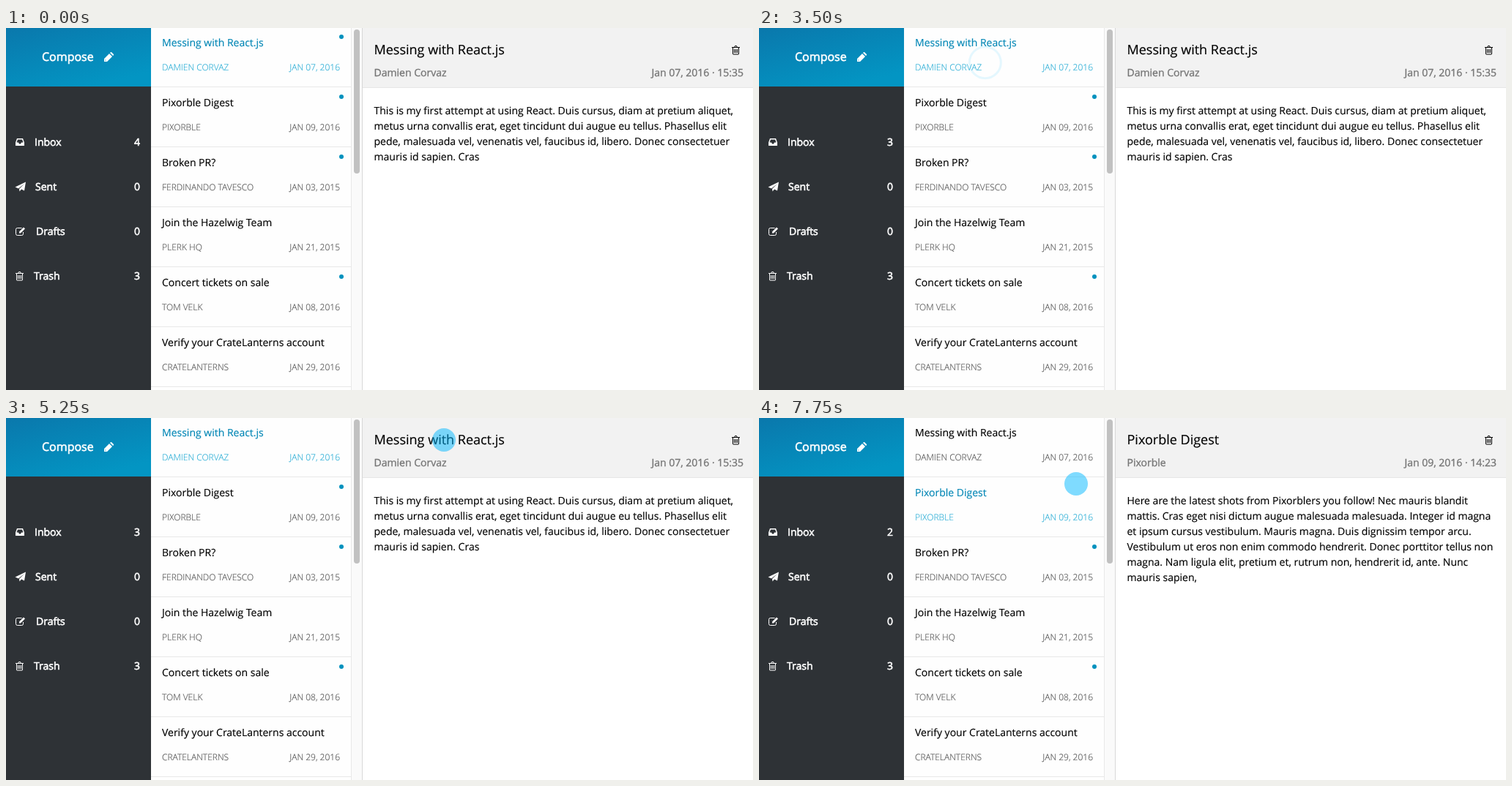
An HTML page for the animation above (8 s loop, 1020x495 px).

```html
<!DOCTYPE html>
<html lang="en">
<head>
<meta charset="utf-8">
<title>Mailbox</title>
<style>
  html, body { margin: 0; width: 100%; height: 100%; overflow: hidden; background: #fff; }
  svg { display: block; font: 14px "Open Sans", sans-serif; text-rendering: geometricPrecision; }
  text { white-space: pre; stroke: #000; stroke-width: .15px; }
  .end { text-anchor: end; }
  .side { fill: #fff; stroke: #fff; stroke-width: .6px; }
  .compose { font-size: 16px; }
  .head { font-size: 18px; }
  .meta { fill: #777; stroke: #777; stroke-width: .35px; }
  .small { font-size: 12px; font-weight: 300; fill: #555; stroke: #555; }
  .selected .title { fill: #0086b5; stroke: #0086b5; }
  .selected .small { fill: #2fafd6; stroke: #2fafd6; }
  .hover .back { fill: #f9f9f9; }
  .line { fill: none; stroke: currentColor; }
</style>
</head>
<body>
<svg id="stage" width="1020" height="495" viewBox="0 0 1020 495"></svg>
<script>
const LOOP = 8000, TICK = 250, READ = 3250, OPEN = 6500;
const ROW = 82, FOLDER = 61, LEADING = 21;

const rows = [
  ["Messing with React.js", "DAMIEN CORVAZ", "JAN 07, 2016", true],
  ["Pixorble Digest", "PIXORBLE", "JAN 09, 2016", true],
  ["Broken PR?", "FERDINANDO TAVESCO", "JAN 03, 2015", true],
  ["Join the Hazelwig Team", "PLERK HQ", "JAN 21, 2015", false],
  ["Concert tickets on sale", "TOM VELK", "JAN 08, 2016", true],
  ["Verify your CrateLanterns account", "CRATELANTERNS", "JAN 29, 2016", false]
];

const mails = [
  ["Messing with React.js", "Damien Corvaz", "Jan 07, 2016 · 15:35",
    "This is my first attempt at using React. Duis cursus, diam at pretium aliquet,",
    "metus urna convallis erat, eget tincidunt dui augue eu tellus. Phasellus elit",
    "pede, malesuada vel, venenatis vel, faucibus id, libero. Donec consectetuer",
    "mauris id sapien. Cras"],
  ["Pixorble Digest", "Pixorble", "Jan 09, 2016 · 14:23",
    "Here are the latest shots from Pixorblers you follow! Nec mauris blandit",
    "mattis. Cras eget nisi dictum augue malesuada malesuada. Integer id magna",
    "et ipsum cursus vestibulum. Mauris magna. Duis dignissim tempor arcu.",
    "Vestibulum ut eros non enim commodo hendrerit. Donec porttitor tellus non",
    "magna. Nam ligula elit, pretium et, rutrum non, hendrerit id, ante. Nunc",
    "mauris sapien,"]
];

// Key points of the pointer: tick, x, y
const route = [
  [5, 305, 23], [6, 288, 32], [8, 288, 32], [9, 308, 32], [15, 309, 31], [16, 335, 40],
  [17, 324, 94], [18, 381, 45], [19, 516, 26], [21, 598, 30], [22, 412, 79],
  [23, 372, 115], [28, 372, 115], [30, 388, 112], [31, 433, 90]
];
const clicks = [7, 12, 25];

const text = (x, y, cls, str, id = "") => `<text x="${x}" y="${y}" class="${cls}" id="${id}">${str}</text>`;
const rect = (x, y, w, h, fill, more = "") => `<rect x="${x}" y="${y}" width="${w}" height="${h}" fill="${fill}" ${more}/>`;
const icon = (x, y, color, body) => `<g transform="translate(${x} ${y})" color="${color}" fill="${color}">${body}</g>`;
const shape = d => `<path fill-rule="evenodd" d="${d}"/>`;
const line = d => `<path class="line" d="${d}"/>`;

const pencil = shape("M0 9 7 2l4 4-7 7H0zM8 1l1-1h1l3 3v1l-1 1zM1.500 10v1.500H3z".replaceAll("1.500", "1.5"));
const trash = line("M0 2.5h11M3.5 2.5l1-2h2l1 2M1.500 2.500v9q0 .5.5.5h7q.5 0 .5-.5v-9M3.500 5v5M5.500 5v5M7.500 5v5".replaceAll(".500", ".5"));
const inbox = shape("M2 0h8l2 5.5V10H0V5.5zM3 1.5l-1.500 4h2.500l1 2h2l1-2h2.500l-1.500-4z".replaceAll(".500", ".5"));
const plane = shape("M14 0l-2 12-4-2-2.500 3-.5-3.500 7-7-8 6.500-4.500-2z".replaceAll(".500", ".5"));
const edit = line("M10.5 7.5V10q0 2-2 2h-6q-2 0-2-2V4q0-2 2-2h6") + shape("M5 7l6-6 2 2-6 6H5z");

// Name, icon, icon width, icon top, count
const folders = [
  ["Inbox", inbox, 12, 151, 4], ["Sent", plane, 13, 210.5, 0],
  ["Drafts", edit, 14, 271.5, 0], ["Trash", trash, 11, 333, 3]
];

const sidebar = rect(0, 0, 198, 495, "#2e3236") + rect(0, 0, 198, 80, "url(#blue)")
  + text(49, 45, "side compose", "Compose") + icon(134, 33, "#fff", pencil)
  + folders.map(([name, mark, width, top, count], i) => {
      const y = 161 + FOLDER * i;
      return icon(13, top, "#fff", mark) + text(27 + width, y, "side", name) + text(183, y, "side end", count, "count" + i);
    }).join("");

const list = rows.map(([title, sender, date, unread], i) =>
  `<g id="row${i}" transform="translate(198 ${ROW * i - 1})">`
  + rect(0, 0, 273, 81, "#fefefe", 'class="back"') + rect(0, 81, 273, 1, "#e8e8e8")
  + text(15, 26, "title", title) + text(15, 59, "small", sender) + text(258, 59, "small end", date)
  + (unread ? `<circle id="dot${i}" cx="260" cy="13" r="3" fill="#0091be"/>` : "") + "</g>").join("");

const scrollbar = rect(471, 0, 15, 495, "#fafafa") + rect(471, 0, 1, 495, "#e8e8e8")
  + rect(486, 0, 1, 495, "#d8d8d8") + rect(475, 2, 8, 197, "#c1c1c1", 'rx="4"');

const reader = rect(487, 0, 533, 81, "#f2f2f2") + rect(487, 81, 533, 1, "#e6e6e6")
  + mails.map(([title, sender, date, ...lines], i) => `<g id="mail${i}">`
    + text(502.5, 36, "head", title) + text(502.5, 66, "meta", sender) + text(1007, 66, "meta end", date)
    + lines.map((str, n) => text(502.5, 118 + LEADING * n, "", str)).join("") + "</g>").join("")
  + icon(991, 24, "#000", trash);

const $ = id => document.getElementById(id);
$("stage").innerHTML = `<defs><linearGradient id="blue" x2=".6" y2="1">
  <stop stop-color="#0a78ac"/><stop offset="1" stop-color="#0395c3"/></linearGradient></defs>`
  + sidebar + list + scrollbar + reader + '<circle id="pointer"/>';

const show = (id, on) => $(id).setAttribute("visibility", on ? "visible" : "hidden");

function pointerAt(tick) {
  const next = route.findIndex(p => p[0] > tick);
  if (next < 1) return next ? route.at(-1).slice(1) : null;
  const [t0, x0, y0] = route[next - 1], [t1, x1, y1] = route[next];
  const k = (tick - t0) / (t1 - t0);
  return [x0 + (x1 - x0) * k, y0 + (y1 - y0) * k];
}

// A click turns the disc into a ring that grows and fades for three ticks
function drawPointer(spot, tick) {
  show("pointer", spot);
  if (!spot) return;
  const [x, y] = spot;
  const age = tick - clicks.findLast(c => c <= tick);
  const look = age < 3
    ? { cy: y + 16, r: 19.5 + age, fill: "none", stroke: "#00b8ff", "stroke-width": 3, opacity: .3 - .1 * age }
    : { cy: y, r: 16, fill: "#00b8ff", stroke: "none", opacity: .5 };
  for (const [key, value] of Object.entries({ cx: x, ...look })) $("pointer").setAttribute(key, value);
}

function draw() {
  const t = performance.now() % LOOP, tick = Math.floor(t / TICK);
  const opened = t >= OPEN, spot = pointerAt(tick);
  const hover = spot && spot[0] < 471 && Math.floor((spot[1] + 1) / ROW) === 1;
  $("count0").textContent = opened ? 2 : t >= READ ? 3 : 4;
  show("dot0", t < READ);
  show("dot1", !opened);
  show("mail0", !opened);
  show("mail1", opened);
  $("row0").setAttribute("class", opened ? "" : "selected");
  $("row1").setAttribute("class", opened ? "selected" : hover ? "hover" : "");
  drawPointer(spot, tick);
  requestAnimationFrame(draw);
}
draw();
</script>
</body>
</html>
```
